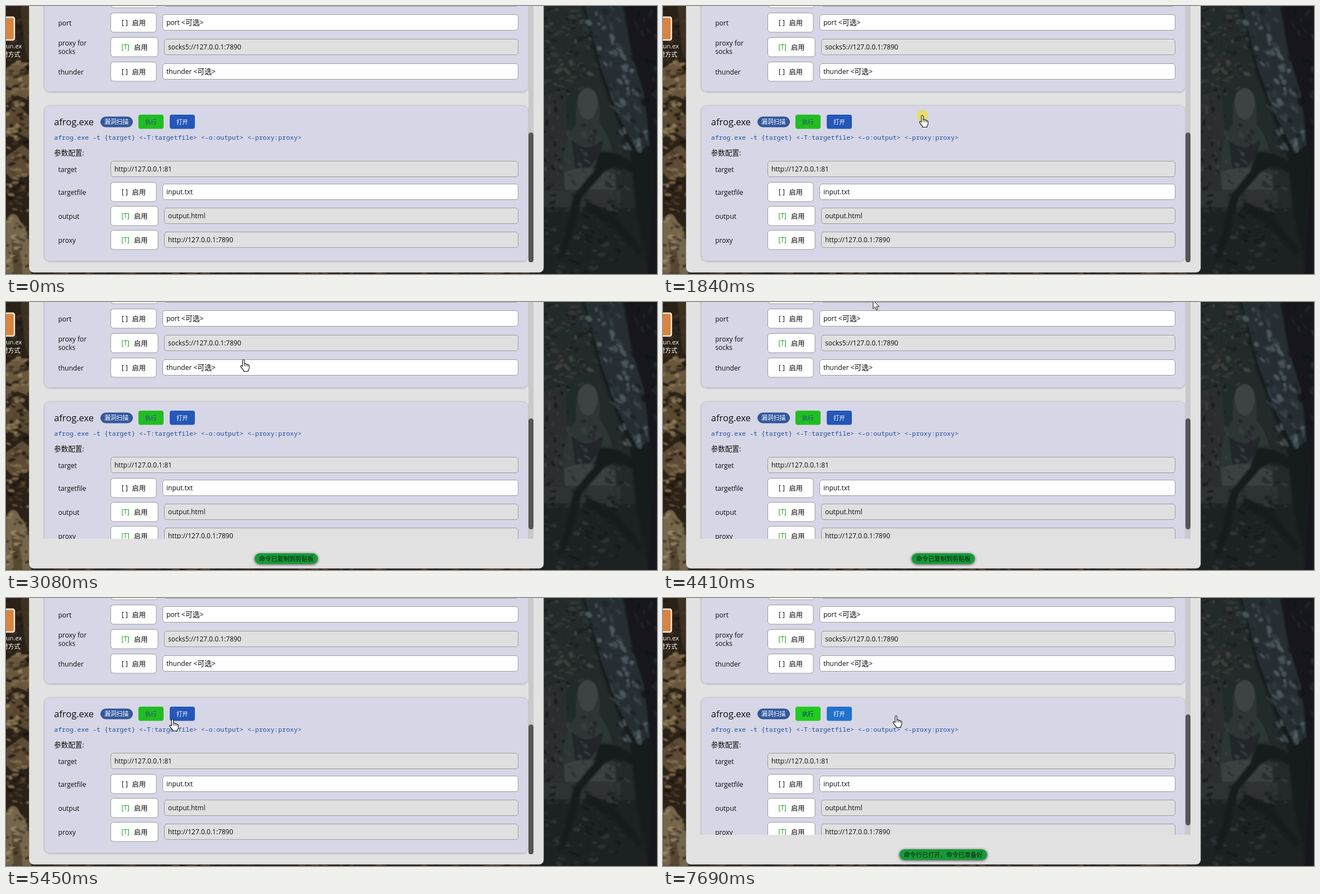
These frames come from a looping animation (1165 px wide and 481 px high, 8 s). An HTML page:

```html
<!DOCTYPE html>
<html lang="zh">
<head>
<meta charset="utf-8">
<style>
html, body { margin: 0; width: 100%; height: 100%; overflow: hidden; background: #222; }
svg { display: block; width: 1165px; height: 481px; }
text { font: 12px "Open Sans", "Noto Sans CJK SC", "Noto Sans CJK", sans-serif; fill: #0c0c0c; white-space: pre; }
.cjk { font-family: "Noto Sans CJK SC", "Noto Sans CJK", sans-serif; }
.mono { font: 11.54px "Noto Sans Mono", monospace; fill: #1f4fa3; }
</style>
</head>
<body>
<svg id="stage" viewBox="0 0 1165 481" xmlns="http://www.w3.org/2000/svg"></svg>
<script>
const stage = document.getElementById('stage');
const LOOP = 8000, STEP = 70;

const esc = s => s.replace(/</g, '&lt;').replace(/>/g, '&gt;');
const text = (x, y, s, attr = '') => `<text x="${x}" y="${y}" ${attr}>${esc(s)}</text>`;
const cjk = (x, y, s, size, fill = '#0c0c0c', attr = '') =>
  `<text class="cjk" x="${x}" y="${y}" style="font-size:${size}px;fill:${fill}" ${attr}>${s}</text>`;
const box = (x, y, w, h, r, fill, attr = '') =>
  `<rect x="${x}" y="${y}" width="${w}" height="${h}" rx="${r}" fill="${fill}" ${attr}/>`;
const path = (d, fill, attr = '') => `<path d="${d}" fill="${fill}" ${attr}/>`;
const line = 'stroke="#9b9b9f" stroke-width="1"';

function field(x, y, value, filled) {
  const [latin, hint] = value.split('|');
  const tail = hint ? `&lt;<tspan class="cjk" style="font-size:13px">${hint}</tspan>&gt;` : '';
  return box(x + .5, y + .5, 916 - x, 28, 4.5, filled ? '#e0e0e0' : '#fff', line) +
    `<text x="${x + 7}" y="${y + 19}">${latin}${tail}</text>`;
}

// One option row; y is the top of its toggle button.
function row(y, labels, on, value) {
  const w = on ? 84.5 : 81.5;
  const mark = on
    ? text(206.5, y + 22, '[T]', 'style="fill:#12a012"')
    : text(207, y + 22, '[ ]');
  const base = y + 22.5 - (labels.length - 1) * 8;
  return labels.map((s, i) => text(93.5, base + i * 15, s)).join('') +
    box(187.5, y + .5, w, 34.5, 5, '#fff', line) + mark +
    cjk(on ? 229 : 225.5, y + 22.5, '启用', 12.3) +
    field(on ? 283 : 280, y + 3, value, on);
}

const card = (y, h) => box(68.5, y + .5, 866, h, 10, '#d7d6e6', 'stroke="#c4c4cf" filter="url(#soft)"');

let seed = 11;
const rnd = () => (seed = seed * 16807 % 2147483647) / 2147483647;

// Scatter n soft flecks of about the given size; lean tilts them.
function flecks(n, x, y, w, h, size, colours, lean = 0) {
  let s = '';
  for (let i = 0; i < n; i++) {
    const cx = (x + rnd() * w).toFixed(1), cy = (y + rnd() * h).toFixed(1);
    const rx = (size * (.4 + rnd())).toFixed(1), ry = (size * (.2 + rnd() * .5)).toFixed(1);
    const c = colours[Math.floor(rnd() * colours.length)];
    s += `<ellipse cx="${cx}" cy="${cy}" rx="${rx}" ry="${ry}" fill="${c}" opacity=".7" ` +
      `transform="rotate(${Math.round(lean + rnd() * 60 - 30)} ${cx} ${cy})"/>`;
  }
  return s;
}

function photo() {
  const tan = ['#8b7755', '#2b2017', '#5f4e36', '#a18c66', '#18120d', '#473826'];
  const left = box(-10, -10, 70, 500, 0, '#2b2118') +
    path('M26 0H45V110L34 80Z', '#3e3023') +
    path('M0 112L20 100L45 120V170L20 160L0 175Z', '#6a583e') +
    path('M0 190L22 178L45 200V240L18 226L0 236Z', '#5a4a33') +
    path('M0 270L30 250L45 262V300L12 312L0 300Z', '#5d4c35') +
    flecks(25, 0, 0, 44, 100, 5, ['#3a2c20', '#1c1510', '#4a3927']) +
    flecks(130, 0, 100, 44, 270, 5.5, tan) +
    path('M0 385Q14 360 26 388Q45 400 45 481H0Z', '#75664c') +
    path('M10 420Q24 410 30 481H14Z', '#574931') +
    flecks(45, 0, 375, 44, 105, 5, ['#a08d6c', '#4c3f2c', '#7d6d51', '#2c2319']);

  const slate = ['#34393a', '#1a1e20', '#2b3031', '#3f4242', '#15191b'];
  const right = box(955, -10, 220, 500, 0, '#24292a') +
    flecks(110, 962, 0, 90, 150, 6, ['#3a3a36', '#1b1e1f', '#2c2f2e', '#454641']) +
    path('M962 160L1000 150L1012 330H962Z', '#292e2e') +
    flecks(60, 962, 150, 50, 180, 5, slate, 90) +
    path('M1000 330Q988 260 1020 212Q1016 150 1041 146Q1066 150 1062 210Q1094 250 1092 330Z', '#2f3536') +
    path('M1024 180Q1020 150 1041 148Q1061 150 1058 182Q1054 202 1041 204Q1027 201 1024 180Z', '#3d4242') +
    path('M1012 240Q1040 268 1070 238Q1062 290 1020 300Z', '#232829') +
    path('M1000 298Q1040 280 1090 304V330H1000Z', '#3a3f3f') +
    flecks(40, 1004, 205, 84, 125, 6, ['#3d4343', '#23282a', '#313738'], 50) +
    box(955, 331, 145, 30, 0, '#2d3334') +
    box(955, 363, 200, 130, 0, '#1d2224') +
    flecks(90, 962, 335, 140, 145, 6, ['#2b3133', '#14181a', '#22282a', '#31383a']) +
    flecks(45, 1080, 170, 75, 200, 6, ['#272d30', '#33393c', '#1b2023']);

  const trunk = path('M1032 0H1165V481H1152L1128 370L1118 270L1092 200L1062 120L1046 50Z', '#171c1f') +
    path('M1036 0H1104L1118 80L1142 160L1152 250L1130 262L1096 196L1064 110Z', '#262f33') +
    ['M1036 0L1106 0', 'M1050 60L1112 60', 'M1066 115L1122 110', 'M1086 170L1136 165', 'M1104 215L1146 215']
      .map((d, i) => flecks(16, 1036 + i * 16, i * 50, 62 - i * 4, 58, 7,
        ['#515e63', '#182024', '#39454a', '#2a3439', '#5d6a6e'], 60)).join('') +
    path('M1110 0H1165V481H1148L1160 300L1142 150L1120 80Z', '#14181a') +
    flecks(20, 1120, 0, 45, 220, 7, ['#2a3236', '#101416', '#1f2629'], 60) +
    path('M1062 262Q1090 258 1128 284L1130 304Q1088 280 1068 300L1030 344L1016 398L1000 450L988 456L1004 392L1016 340L1052 296Z', '#171b1d') +
    path('M1040 350L1090 376L1140 440L1132 448L1080 392L1036 366Z', '#191d1f');
  const floor = box(0, 476, 1165, 8, 0, '#2a241c') +
    flecks(60, 30, 479, 900, 4, 8, ['#5d4e38', '#1a1713', '#41372a']);
  return `<g filter="url(#b1)">${floor}${left}${right}</g><g filter="url(#b2)">${trunk}</g>`;
}

const toast = (id, x, w, s, tx) => `<g id="${id}">` +
  box(x, 451, w, 19, 9.5, '#199a38', 'filter="url(#drop)"') + cjk(tx, 464.8, s, 10.85, '#061c0b') + '</g>';

stage.innerHTML = `<defs>
<filter id="b1" x="-5%" width="110%"><feGaussianBlur stdDeviation=".9"/></filter>
<filter id="b2" x="-20%" width="140%"><feGaussianBlur stdDeviation="1.6"/></filter>
<filter id="soft" x="-5%" y="-5%" width="110%" height="115%"><feDropShadow dx="0" dy="1" stdDeviation="1.5" flood-opacity=".22"/></filter>
<filter id="drop" x="-10%" y="-60%" width="120%" height="240%"><feDropShadow dx="0" dy="1" stdDeviation="2.5" flood-opacity=".75"/></filter>
<clipPath id="view"><rect id="clip" x="59" y="0" width="886" height="478"/></clipPath></defs>` +
  photo() +
  box(-20, 20, 35, 41, 3, '#d9843f', 'stroke="#f3ebe0" stroke-width="2.5"') +
  text(0, 76, 'un.ex', 'style="fill:#fff;font-size:11px"') +
  cjk(-7.5, 91, '捷方式', 11, '#fff') +
  box(41.5, -20, 920.5, 498, 8, '#e2e2e2', 'stroke="#bdbdbd" stroke-width=".8"') +
  '<g clip-path="url(#view)">' +
  card(-30, 183) +
  box(187.5, -32, 84.5, 35, 5, '#fff', line) +
  box(283.5, -29, 633, 29.5, 4.5, '#e0e0e0', line) +
  row(12, ['port'], false, 'port |可选') +
  row(56, ['proxy for', 'socks'], true, 'socks5://127.0.0.1:7890') +
  row(100, ['thunder'], false, 'thunder |可选') +
  card(178, 279) +
  text(86, 214, 'afrog.exe', 'style="font-size:16.5px"') +
  box(169.5, 199, 57, 18, 9, '#34589f', 'stroke="#284a8c"') +
  cjk(176, 212.2, '漏洞扫描', 10.85, '#fff') +
  box(237, 195, 45, 25.5, 4, '#21bd21', 'id="run"') +
  cjk(249, 211.8, '执行', 10.3, '#244a8c', 'id="runText"') +
  box(293, 195, 45, 25.5, 4, '#2457b8', 'id="open"') +
  cjk(305, 211.8, '打开', 10.3, '#fff') +
  text(86, 240.2, 'afrog.exe -t {target} <-T:targetfile> <-o:output> <-proxy:proxy>', 'class="mono"') +
  cjk(86, 268, '参数配置:', 12.6) +
  text(93.5, 297.5, 'target') +
  field(187, 278, 'http://127.0.0.1:81', true) +
  row(316, ['targetfile'], false, 'input.txt') +
  row(359, ['output'], true, 'output.html') +
  row(402, ['proxy'], true, 'http://127.0.0.1:7890') +
  box(935, -10, 9, 470, 0, '#c9c9cb') +
  box(935, 227, 9, 233, 4.5, '#555557', 'id="thumb"') +
  '</g>' +
  toast('copied', 445, 113, '命令已复制到剪贴板', 453) +
  toast('ready', 423, 157, '命令行已打开，命令已准备好', 431) +
  '<circle id="halo" r="10.5" fill="#e8e04a" opacity=".78"/>' +
  '<g id="hand" stroke="#111" stroke-width="1.1" stroke-linejoin="round">' +
  path('M-1.6 1.2Q-1.6 -.5 0 -.5Q1.6 -.5 1.6 1.2V7Q4.2 5.6 4.7 7.8Q7.4 6.8 7.7 9Q10.3 8.3 10.3 10.8V14.5Q10 17 8.4 18.5V20.5H.4V19Q-2.5 16 -4.8 12.4Q-5.6 10.2 -3.8 10Q-2.6 10 -1.6 11.6Z', '#fff') +
  path('M1.6 7V11M4.7 8V11.5M7.7 9.2V12', 'none', 'stroke-width=".9"') + '</g>' +
  path('M0 0V15.2L3.5 12L5.9 17.5L8.3 16.5L6 11.2H10.8Z', '#fff', 'id="arrow" stroke="#111" stroke-width="1" stroke-linejoin="round"');

const el = id => document.getElementById(id);

// Spans in which the pointer is redrawn, and its path through them.
const spans = [[590, 1360], [1430, 1910], [2170, 2940], [3010, 3290], [4020, 4080],
  [4410, 5110], [5240, 5870], [6660, 7080]];
const track = [
  [590, 650, 457], [870, 520, 380], [1150, 345, 285], [1360, 312, 249], [1500, 365, 232],
  [1780, 464, 197], [2100, 464, 197], [2170, 466, 215], [2450, 519, 398], [2590, 519, 355],
  [2660, 517, 348], [2940, 449, 230], [3080, 425, 104], [3150, 418, 36], [3290, 410, -40],
  [4020, 375, -14], [4340, 376, -14], [4410, 376, -3], [4480, 380, 4], [4620, 380, 4],
  [4900, 425, 270], [5110, 447, 430], [5240, 425, 400], [5450, 298, 218],
  [5590, 304, 209], [5800, 276, 211], [5870, 274, 211], [6730, 274, 211], [7080, 417, 212]];

const within = (t, a, b) => t >= a && t < b;

function held(t) {
  let u = 0;
  for (const [a, b] of spans) if (t >= a) u = Math.min(a + Math.floor((t - a) / STEP) * STEP, b);
  return u;
}

function pointer(t) {
  const u = held(t);
  let i = 0;
  while (i < track.length - 2 && track[i + 1][0] <= u) i++;
  const [t0, x0, y0] = track[i], [t1, x1, y1] = track[i + 1];
  const k = Math.max(0, Math.min(1, (u - t0) / (t1 - t0)));
  return [x0 + (x1 - x0) * k, y0 + (y1 - y0) * k];
}

const show = (id, on) => el(id).setAttribute('visibility', on ? 'visible' : 'hidden');

function draw(t) {
  const copied = within(t, 1910, 4900), ready = t >= 7480, short = copied || ready;
  show('copied', copied);
  show('ready', ready);
  el('clip').setAttribute('height', short ? 425 : 478);
  el('thumb').setAttribute('y', short ? 209 : 227);
  el('thumb').setAttribute('height', short ? 199 : 233);

  const hover = t >= 5660, down = within(t, 6660, 6800);
  el('run').setAttribute('fill', down ? '#139513' : hover ? '#21cb21' : '#21bd21');
  el('runText').style.fill = hover ? '#10206f' : '#244a8c';
  el('open').setAttribute('fill', t >= 5520 ? '#2273cc' : '#2457b8');

  const [x, y] = pointer(t);
  const seen = within(t, 590, 3220) || t >= 4020;
  const plain = y < 12 || y > 457 || within(y, 154, 178);
  const at = `translate(${x.toFixed(1)} ${y.toFixed(1)})`;
  for (const id of ['hand', 'arrow', 'halo']) el(id).setAttribute('transform', at);
  show('hand', seen && !plain);
  show('arrow', seen && plain);
  show('halo', within(t, 1780, 1910) || within(t, 2590, 2660) || within(t, 4480, 4620));
}

const start = performance.now();
function tick() {
  draw((performance.now() - start) % LOOP);
  requestAnimationFrame(tick);
}
draw(0);
requestAnimationFrame(tick);
</script>
</body>
</html>
```
